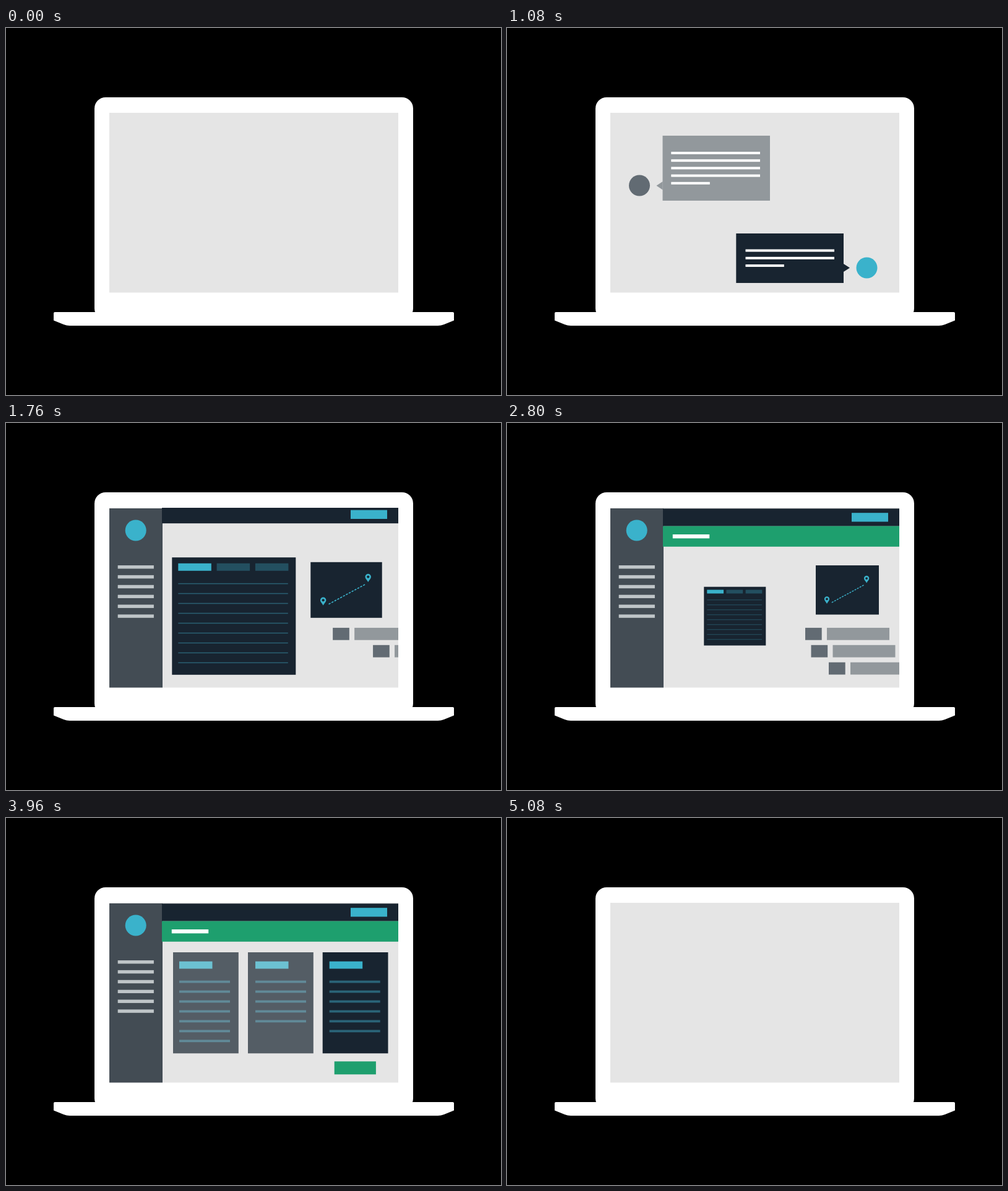
An HTML page for the animation above (5.32 s loop, 800 px wide and 593 px high).

```html
<!DOCTYPE html>
<html lang="en">
<head>
<meta charset="utf-8">
<title>Laptop screen flow</title>
<style>
html, body { margin: 0; width: 100%; height: 100%; overflow: hidden; background: #000; }
svg { display: block; width: 100%; height: 100%; }
</style>
</head>
<body>
<svg id="stage" viewBox="0 0 800 593">
  <defs><clipPath id="screen"><rect x="167" y="137" width="467" height="290.5"/></clipPath></defs>
  <rect width="800" height="593" fill="#000"/>
  <rect x="143" y="112" width="515" height="359" rx="18" fill="#fff"/>
  <path d="M79 459H722Q724 459 724 461V472.5L708 479Q703 481 698 481H103Q98 481 93 479L77 472.5V461Q77 459 79 459Z" fill="#fff"/>
  <rect x="167" y="137" width="467" height="290.5" fill="#e5e5e5"/>
  <g id="scene" clip-path="url(#screen)"></g>
</svg>
<script>
const LOOP = 5320, TICK = 40;
const NAVY = '#182430', CYAN = '#3ab2cb', GREEN = '#1e9f6e', GREY = '#92989c', SLATE = '#626b73';
const scene = document.getElementById('scene');

function add(parent, tag, attrs) {
  const el = document.createElementNS('http://www.w3.org/2000/svg', tag);
  for (const key in attrs) el.setAttribute(key, attrs[key]);
  return parent.appendChild(el);
}
const group = () => add(scene, 'g', {});
const box = (g, x, y, width, height, fill) => add(g, 'rect', { x, y, width, height, fill });
const disc = (g, cx, cy, r, fill) => add(g, 'circle', { cx, cy, r, fill });
const shape = (g, d, fill) => add(g, 'path', { d, fill });

// Horizontal bars, spaced evenly; y is the centre of the first one.
function bars(g, x, y, width, height, count, step, fill) {
  for (let i = 0; i < count; i++) box(g, x, y + i * step - height / 2, width, height, fill);
}

// Chat messages
const asking = group();
box(asking, 251.5, 174, 173.5, 105, GREY);
shape(asking, 'M241.5 254.8L251.6 248V261.5Z', GREY);
disc(asking, 214, 254.5, 17, SLATE);
bars(asking, 265.3, 202, 143.7, 4, 4, 12.2, '#fff');
bars(asking, 265.3, 250.8, 62.5, 4, 1, 0, '#fff');

const reply = group();
box(reply, 370.3, 332, 173.7, 80, NAVY);
shape(reply, 'M554 387.6L543.9 381V394Z', NAVY);
disc(reply, 581.5, 387.6, 17, CYAN);
bars(reply, 385.5, 359.6, 143.5, 4, 2, 12.2, '#fff');
bars(reply, 385.5, 384, 62.3, 4, 1, 0, '#fff');

// Table panel, drawn around its centre
const panel = group();
box(panel, -100, -95, 200, 189.6, NAVY);
[CYAN, '#234f60', '#234f60'].forEach((fill, i) => box(panel, -90 + i * 62.3, -85.4, 53.5, 12, fill));
bars(panel, -90, -52.6, 177.5, 1.5, 9, 15.97, '#2a6073');

// Route map, drawn around its centre
const map = group();
box(map, -68, -53, 136, 106, NAVY);
add(map, 'path', { d: 'M-33.5 27L36.5 -11', stroke: CYAN, 'stroke-width': 1.9, 'stroke-dasharray': '4 2.2' });
for (const [x, y] of [[-44, 29.5], [41.5, -15]]) {
  shape(map, `M${x} ${y}C${x - 2} ${y - 4} ${x - 5.6} ${y - 6.5} ${x - 5.6} ${y - 10}A5.6 5.6 0 0 1 ${x + 5.6} ${y - 10}C${x + 5.6} ${y - 6.5} ${x + 2} ${y - 4} ${x} ${y}Z`, CYAN);
  disc(map, x, y - 10, 2.5, NAVY);
}

const rows = [0, 1, 2].map(i => {
  const g = group(), y = 330.9 + i * 27.9;
  box(g, 482, y, 26.7, 19.8, SLATE);
  box(g, 517, y, 101, 19.8, GREY);
  return g;
});

// Option cards: x, inner margin, line count
const cards = [[270, 10, 7], [391, 12, 5], [511.7, 11, 6]].map(([x, pad, count]) => {
  const g = group();
  box(g, x, 217, 105.8, 163.3, NAVY);
  box(g, x + pad, 231.7, 53.5, 11.8, CYAN);
  bars(g, x + pad, 264.6, 82, 3.8, count, 15.95, '#2a6478');
  return g;
});

const button = group();
box(button, 530.7, 393.3, 67.2, 21, GREEN);

const side = group();
box(side, 167, 138, 86, 290, '#434c54');
disc(side, 209.7, 173.5, 17, CYAN);
bars(side, 180.7, 232.7, 58.2, 5.4, 6, 15.88, '#bfc5c8');

const header = group();
box(header, 252, 138.3, 382, 28.4, NAVY);
box(header, 557, 145.2, 59, 14.3, CYAN);

const notice = group();
box(notice, 252, 166.6, 382, 33.2, GREEN);
box(notice, 267.8, 180, 59.4, 6.4, '#fff');

// Distance still to go (1 to 0) when arriving, distance gone (0 to 1) when leaving.
const part = (t, start, length) => Math.min(1, Math.max(0, (t - start) / length));
const arrive = (t, start, length = 240, power = 1.72) => Math.pow(1 - part(t, start, length), power);
const leave = (t, start, length = 160, power = 2) => Math.pow(part(t, start, length), power);

const move = (g, x, y) => g.setAttribute('transform', `translate(${x.toFixed(2)} ${y.toFixed(2)})`);
const zoom = (g, x, y, s) => g.setAttribute('transform', `translate(${x} ${y}) scale(${Math.max(0, s).toFixed(4)})`);

function draw(t) {
  move(asking, -262 * arrive(t, 40, 240, 2), 11.5 - 164 * leave(t, 1040, 200, 1.65));
  move(reply, 266 * arrive(t, 320, 240, 2), -16 + 152 * leave(t, 1040, 200, 1.4));

  move(side, -86 * (arrive(t, 1360) + leave(t, 4760)), 0);
  move(header, 0, -30 * (arrive(t, 1600) + leave(t, 4920)));
  move(notice, 0, -63 * (arrive(t, 2280, 160, 3.2) + leave(t, 4840)));

  zoom(panel, 368.3, 312.2, 1 - arrive(t, 1480) - leave(t, 2680, 180, 1.71));
  zoom(map, 550, 269.8, 1 - arrive(t, 1600) - leave(t, 2720, 180, 1.71));
  rows.forEach((g, i) =>
    move(g, 152 * (arrive(t, 1640 + i * 80) + leave(t, 2760 - (i - 1) * 40)), 0));

  const starts = [3120, 3280, 3400];
  cards.forEach((g, i) => {
    move(g, 0, 211 * (arrive(t, starts[i], 200, 2) + leave(t, 4760 + i * 60, 176)));
    g.setAttribute('opacity', i === 2 ? 0.7 + 0.3 * part(t, 3880, 80) : 0.7);
  });
  move(button, 0, 36 * (arrive(t, 3880, 80, 1) + leave(t, 4800)));
}

const begin = performance.now();
function frame() {
  const t = (performance.now() - begin) % LOOP;
  draw(Math.floor(t / TICK) * TICK);
  requestAnimationFrame(frame);
}
frame();
</script>
</body>
</html>
```
